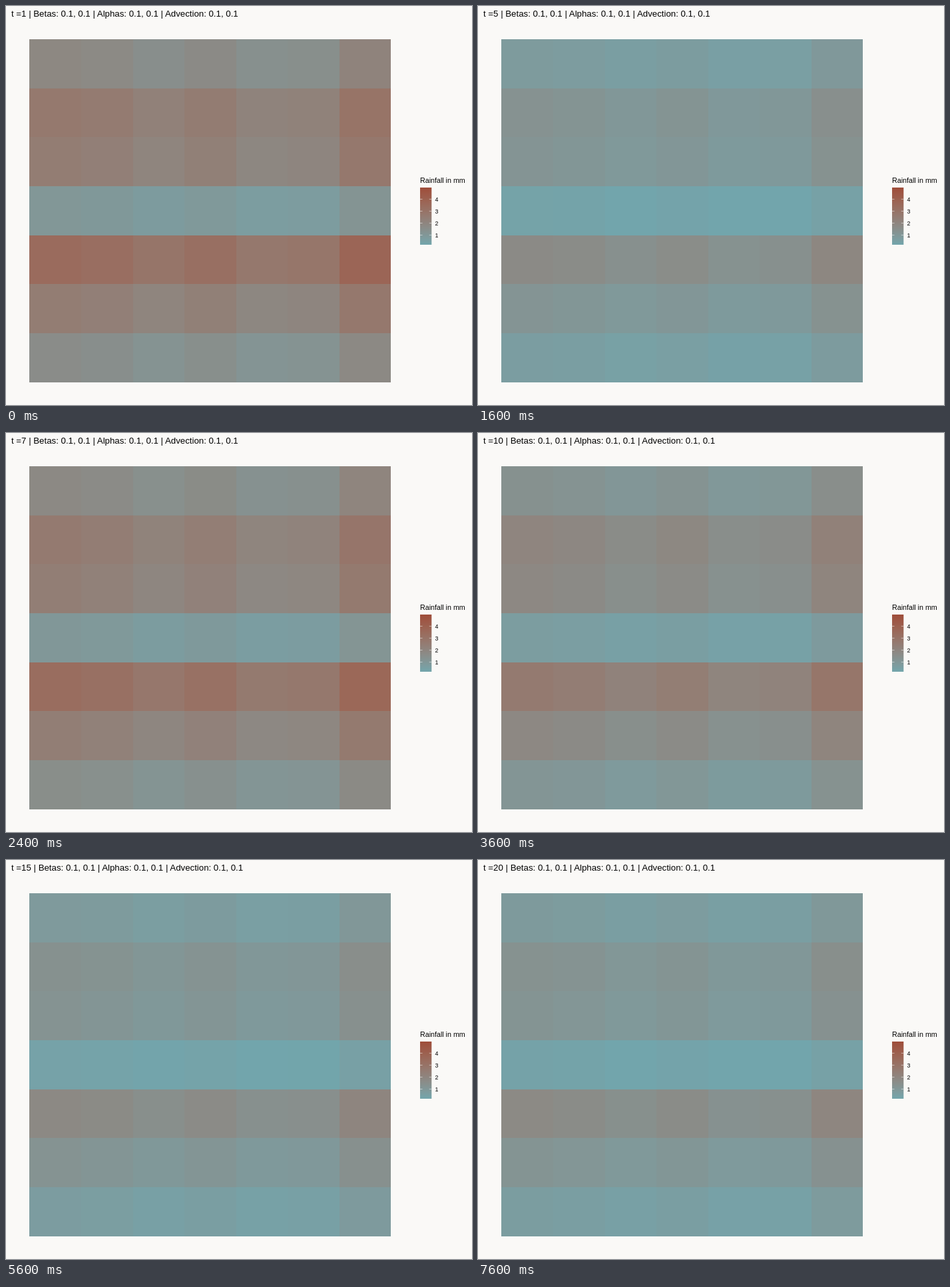
An HTML page that plays this animation: 700x600 px, repeating every 8000 ms.

```html
<!DOCTYPE html>
<html lang="en">
<head>
<meta charset="utf-8">
<title>Rainfall grid</title>
<style>
  html, body { margin: 0; width: 100%; height: 100%; overflow: hidden; background: #faf9f7; }
  svg { display: block; width: 700px; height: 600px; font-family: "Liberation Sans", Arial, sans-serif; }
  #title { font-size: 13.25px; }
  #name { font-size: 10.7px; }
  #key text { font-size: 8.8px; }
  #key line { stroke: #fff; stroke-width: .5; }
  #grid rect { shape-rendering: crispEdges; }
</style>
</head>
<body>
<svg viewBox="0 0 700 600">
  <text id="title" x="8" y="15.5"></text>
  <g id="grid"></g>
  <text id="name" x="622" y="266">Rainfall in mm</text>
  <g id="key"></g>
</svg>
<script>
const LOW = '#72a5ac', HIGH = '#9f4d3a';
const MIN = 0.19, MAX = 4.97;
const STEP = 400, COUNT = 20, DECAY = 0.45;

// Wetness of each row, and how far each column departs from it
const ROW = [0.87, 1.11, 1.05, 0.56, 1.29, 1.05, 0.78];
const COL = [0, -0.04, -0.13, -0.05, -0.17, -0.14, 0.07];

// Showers: each starts at its peak and fades towards its floor
const SHOWERS = [
  { from: 0, peak: 0.52, floor: 0 },
  { from: 5, peak: 0.75, floor: 0.28 },
  { from: 10, peak: 0.09, floor: 0 },
  { from: 12, peak: 0.24, floor: 0 },
  { from: 16, peak: 0.32, floor: 0 }
];

const $ = id => document.getElementById(id);
const edgeX = i => Math.round(35.45 + 77.55 * i);
const edgeY = j => Math.round(50 + 73.68 * j);

function add(parent, tag, attrs, text = '') {
  const el = document.createElementNS('http://www.w3.org/2000/svg', tag);
  for (const k in attrs) el.setAttribute(k, attrs[k]);
  el.textContent = text;
  parent.appendChild(el);
  return el;
}

function shade(mm) {
  const p = Math.min(1, Math.max(0, (mm - MIN) / (MAX - MIN))) * 100;
  return `color-mix(in lab, ${HIGH} ${p.toFixed(2)}%, ${LOW})`;
}

function intensity(k) {
  const { from, peak, floor } = SHOWERS.findLast(s => s.from <= k);
  return floor + (peak - floor) * DECAY ** (k - from);
}

const rainfall = (level, t) => (level * (1 + 0.3 * t) + 0.7 * t) ** 2;

const cells = [];
ROW.forEach((r, j) => COL.forEach((c, i) => {
  const x = edgeX(i), y = edgeY(j);
  const el = add($('grid'), 'rect', {
    x, y, width: edgeX(i + 1) - x, height: edgeY(j + 1) - y
  });
  cells.push({ el, level: r + c });
}));

for (let y = 273; y < 359; y++) {
  const mm = MAX - (MAX - MIN) * (y - 272.5) / 86;
  add($('key'), 'rect', { x: 622, y, width: 17.3, height: 1 }).style.fill = shade(mm);
}
for (let n = 1; n <= 4; n++) {
  const y = 362.5 - 18 * n;
  add($('key'), 'line', { x1: 622, x2: 625.5, y1: y, y2: y });
  add($('key'), 'line', { x1: 635.8, x2: 639.3, y1: y, y2: y });
  add($('key'), 'text', { x: 644.5, y: y + 3.2 }, n);
}

let shown = -1;
function draw(k) {
  if (k === shown) return;
  shown = k;
  const t = intensity(k);
  $('title').textContent =
    `t =${k + 1} | Betas: 0.1, 0.1 | Alphas: 0.1, 0.1 | Advection: 0.1, 0.1`;
  for (const { el, level } of cells) el.style.fill = shade(rainfall(level, t));
}

const start = performance.now();
function tick() {
  draw(Math.floor((performance.now() - start) / STEP) % COUNT);
  requestAnimationFrame(tick);
}
draw(0);
requestAnimationFrame(tick);
</script>
</body>
</html>
```
